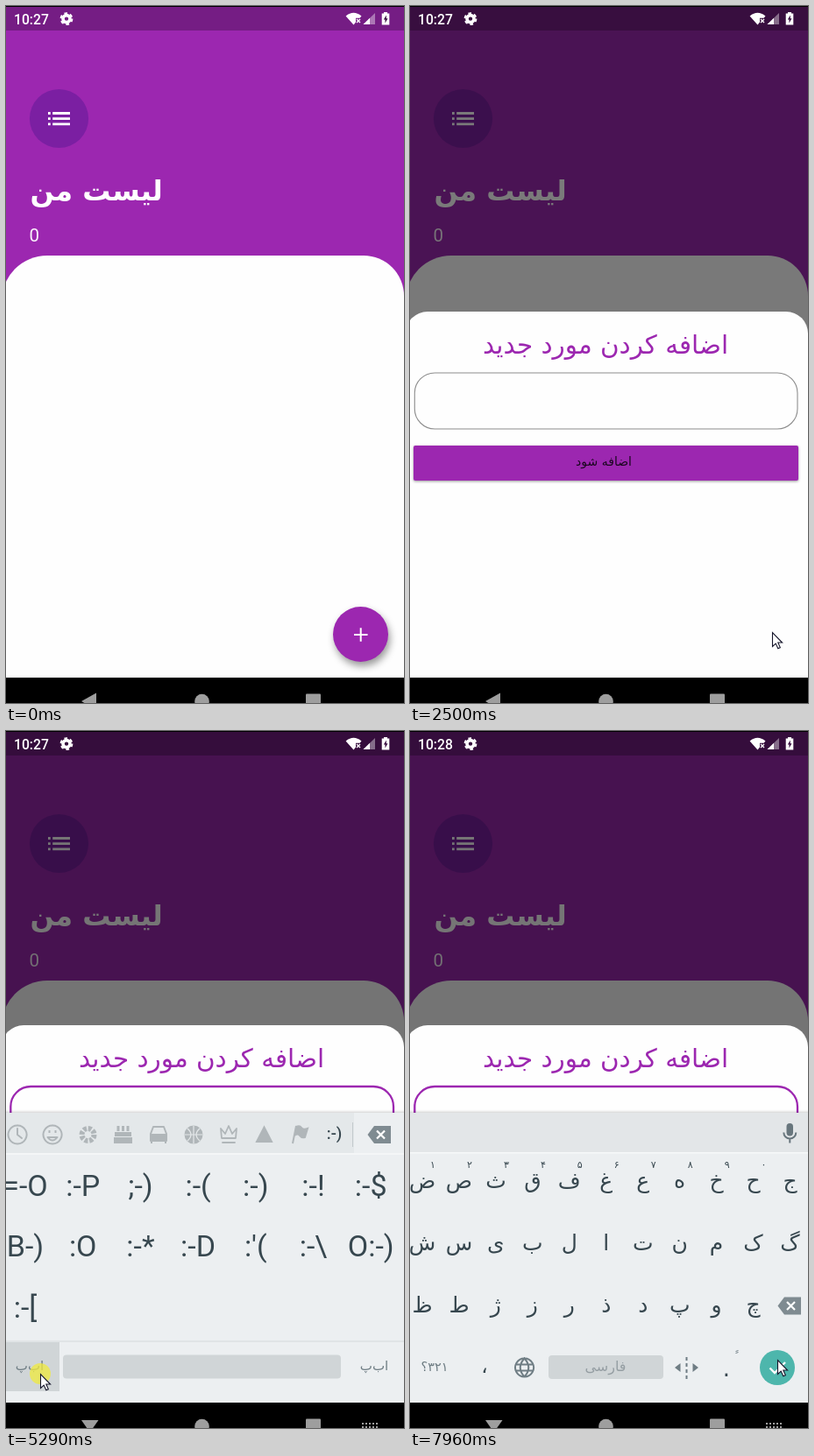
An HTML page for the animation above (8 s loop, 454 px wide and 796 px high).

```html
<!DOCTYPE html>
<html lang="fa">
<head>
<meta charset="utf-8">
<title>List</title>
<style>
  html, body { margin: 0; width: 100%; height: 100%; overflow: hidden; background: #000; }
  svg { display: block; width: 100%; height: 100%; }
  text { font-family: Roboto, "DejaVu Sans", sans-serif; white-space: pre; }
  .fa { font-family: "DejaVu Sans", sans-serif; }
  .mid { text-anchor: middle; }
  .line { fill: none; stroke-linecap: round; stroke-linejoin: round; }
</style>
</head>
<body>
<svg viewBox="0 0 454 796" xmlns="http://www.w3.org/2000/svg">
  <!-- list page -->
  <rect y="1" width="454" height="766" fill="#9c27b0"/>
  <rect y="1" width="454" height="27" fill="#751d84"/>
  <circle cx="60.5" cy="128.5" r="33.6" fill="#7b1fa2"/>
  <path d="M48 122.5h2.7m2.5 0H73M48 128.7h2.7m2.5 0H73M48 134.9h2.7m2.5 0H73" stroke="#fff" stroke-width="2.8"/>
  <text class="fa" x="27.5" y="222" font-size="32" font-weight="700" fill="#fff">لیست من</text>
  <text x="26.5" y="269" font-size="20.5" fill="#fff" fill-opacity=".94">0</text>
  <path d="M-5 767V337A52 52 0 0 1 47 285H408A46 46 0 0 1 454 331V767Z" fill="#fefefe"/>
  <path id="glow" d="M10 0H437V20Q223.5 52 10 20Z" fill="#9c27b0"/>
  <circle cx="404.5" cy="717.5" r="31.5" fill="#9c27b0" style="filter:drop-shadow(2px 5px 4px #0006)"/>
  <path d="M397 718H412.5M404.7 710.3V725.8" stroke="#fff" stroke-width="2"/>
  <rect id="scrim" y="1" width="454" height="766"/>

  <!-- status icons -->
  <text id="clock" x="9" y="21" font-size="15.7" font-weight="500" fill="#fff"></text>
  <g fill="#fff">
    <circle cx="69" cy="14.6" r="4" fill="none" stroke="#fff" stroke-width="3.6"/>
    <circle cx="69" cy="14.6" r="6.4" fill="none" stroke="#fff" stroke-width="2" stroke-dasharray="3.6 3.1"/>
    <path d="M387.6 11.5Q396.5 4 405.5 11.5L403.5 13.8H399V18.5L396.5 21.5Z"/>
    <path d="M400 15l4 4m0-4l-4 4" stroke="#fff" stroke-width="1.4"/>
    <path d="M421 8V21H407.5Z" opacity=".4"/>
    <path d="M415 13.8V21H407.5Z"/>
    <path d="M431 8.5V7h4v1.5h2.3V21.5h-8.6V8.5z"/>
  </g>
  <path d="M433.8 10.5L430.8 15.5H432.5V19.5L435.5 14.3H433.8Z" fill="#3a0f42"/>

  <!-- bottom sheet -->
  <g id="sheet">
    <path d="M-5 440V25A25 25 0 0 1 20 0H429A25 25 0 0 1 454 25V440Z" fill="#fefefe"/>
    <text class="fa mid" x="223" y="48" font-size="29.4" fill="#9c27b0">اضافه کردن مورد جدید</text>
    <rect id="field" x="5.3" y="70" width="436.7" height="64" rx="23" fill="none"/>
    <rect id="caret" x="15.5" y="91" width="2" height="25" fill="#4285f4"/>
    <rect x="4" y="153" width="439" height="40" rx="2" fill="#9c27b0" style="filter:drop-shadow(0 1.5px 1.5px #0006)"/>
    <text class="fa mid" x="221" y="176" font-size="14" fill="#1b0720">اضافه شود</text>
  </g>

  <!-- keyboards -->
  <g id="keyboard">
    <rect x="-5" y="436" width="464" height="340" fill="#eceff1" style="filter:drop-shadow(0 -1px 1.5px #0003)"/>
    <g id="emoticons">
      <rect y="436" width="397" height="46" fill="#e4e8ea"/>
      <path d="M0 483H454" stroke="#f7f9fa" stroke-width="1.5"/>
      <path d="M395.5 447V475" stroke="#c3c9cc"/>
      <g fill="#b0b6b9" stroke="#b0b6b9" stroke-width="2">
        <path class="line" d="M13 454V461L18 465M13 450.5a10.5 10.5 0 1 0 .1 0M53 450.5a10.5 10.5 0 1 0 .1 0M47.5 464Q53 471 58.5 464Z"/>
        <path d="M48.500 457.5h2m5 0h2" stroke-width="3"/>
        <circle cx="93.5" cy="461" r="7" fill="none" stroke-width="6" stroke-dasharray="3.8 1.7"/>
        <path d="M124 465h19v5h-19zM125 459h17v3h-17z"/>
        <path d="M128 451v6m5.500-6v6m5.5-6v6" stroke-width="3"/>
        <path d="M165 460l3-8h12l3 8v8h-18z" class="line"/>
        <path d="M165 461h18v5h-18zM166 469v2m16-2v2"/>
        <circle cx="214" cy="461" r="9.5"/>
        <path class="line" d="M246 465L245 454L250 460L254 451L258 460L263 454L262 465ZM247 470H261" stroke-width="1.8"/>
        <path d="M294.5 452.5L303 469H286Z"/>
        <path d="M327 471L331 451M331 452Q335 450 337 453T344 454L341 464Q337 465 335 462T329 462Z"/>
      </g>
      <path d="M214 451V471M204 461H224M207 454Q215 461 207 468M221 454Q213 461 221 468" class="line" stroke="#e4e8ea" stroke-width="1.2"/>
      <text class="mid" x="374.5" y="466" font-size="18.5" font-weight="500" fill="#37474f">:-)</text>
      <path d="M0 697H454" stroke="#dde1e3" stroke-width="1.5"/>
      <rect id="pressed" y="698" width="61" height="56" fill="#d0d5d7"/>
      <rect x="65" y="712.5" width="317" height="27" rx="4" fill="#d0d5d7"/>
    </g>
    <g id="letters">
      <rect y="436" width="454" height="45" fill="#e3e6e8"/>
      <path d="M0 481.7H454" stroke="#f7f9fa" stroke-width="1.5"/>
      <rect x="429.5" y="448" width="7.5" height="14.5" rx="3.7" fill="#68767d"/>
      <path d="M426.3 458.5a7 7 0 0 0 14 0M433.3 466V470.5" fill="none" stroke="#68767d" stroke-width="2"/>
      <path d="M130.5 716.5a10.5 10.5 0 1 0 .1 0M130.5 716.5Q121 727 130.5 737.5Q140 727 130.5 716.5M121 723.5H140M121 730.5H140" class="line" stroke="#6f7d84" stroke-width="2"/>
      <rect x="158" y="713" width="131" height="27" rx="4" fill="#d0d5d7"/>
      <path d="M308.5 722V732L302 727ZM322.5 722V732L329 727Z" fill="#6f7d84"/>
      <path d="M315.5 715V740" stroke="#6f7d84" stroke-width="2" stroke-dasharray="4 3"/>
      <path d="M371.5 708.5l3-1m-3 3l3-1" stroke="#6f7d84"/>
      <circle cx="419" cy="727" r="20" fill="#4db6ac"/>
      <path d="M410.5 727.5L416 733L428 721" fill="none" stroke="#fff" stroke-width="2.4"/>
      <g id="popup">
        <rect x="123" y="600" width="34" height="12.5" fill="#c3c9cc"/>
        <rect x="113" y="483" width="54.5" height="125" rx="3" fill="#d0d5d7" style="filter:drop-shadow(0 1.5px 1px #0007)"/>
      </g>
    </g>
    <g id="erase">
      <path d="M427 646.5H446V666.5H427L419.5 656.5Z" fill="#7f8b91"/>
      <path d="M430 652l9 9m0-9l-9 9" stroke="#fff" stroke-width="2.2"/>
    </g>
  </g>

  <!-- navigation bar -->
  <rect y="767" width="454" height="29"/>
  <g fill="#9e9e9e">
    <path id="back"/>
    <circle cx="223.5" cy="794" r="8.3"/>
    <rect x="342" y="785.5" width="17" height="17" rx="1"/>
    <path id="keys" d="M406 791H424M406 795H424" stroke="#9e9e9e" stroke-width="2" stroke-dasharray="2 2"/>
  </g>

  <g id="pointer">
    <circle id="press" r="12" fill="#f0ea3c" opacity=".75"/>
    <path d="M.5 .5V16.5L4.2 13.1L6.8 18.7L9.3 17.6L6.8 12H11.6Z" fill="#fff" stroke="#15152a" stroke-width="1.1"/>
  </g>
</svg>
<script>
const $ = id => document.getElementById(id);
const INK = '#37474f', GREY = '#6f7d84';

function label(parent, text, x, y, size, fill, type = 'fa') {
  const el = document.createElementNS('http://www.w3.org/2000/svg', 'text');
  const attrs = { x, y, 'font-size': size, fill, class: type + ' mid' };
  for (const name in attrs) el.setAttribute(name, attrs[name]);
  el.textContent = text;
  parent.append(el);
}

// Emoticon page
['=-O :-P ;-) :-( :-) :-! :-$', "B-) :O :-* :-D :'( :-\\ O:-)", ':-['].forEach((row, r) =>
  row.split(' ').forEach((face, i) =>
    label($('emoticons'), face, 22 + 65.7 * i, Math.floor(531 + 69.5 * r), 34, INK, 'latin')));
for (const x of [27, 420]) label($('emoticons'), 'اب\u200cپ', x, 730, 15, GREY);

// Letter page
const letters = $('letters'), popup = $('popup');
['ضصثقفغعهخحج', 'شسیبلاتنمکگ', 'ظطژزرذدپوچ'].forEach((row, r) =>
  [...row].forEach((key, i) => label(letters, key, 14 + 41.95 * i, 522 + 71 * r, 25, INK)));
[...'۱۲۳۴۵۶۷۸۹۰'].forEach((digit, i) => label(letters, digit, 26 + 41.95 * i, 499, 11, INK));
label(letters, '\u200f۳۲۱؟', 28, 731, 14.5, GREY);
label(letters, '،', 85, 733, 23, INK);
label(letters, '.', 361, 737, 26, INK);
label(letters, 'فارسی', 223, 731, 16, '#959ea3');
label(popup, 'ب', 140, 525, 36, '#263238');
letters.append(popup);

// Key lists: [time, value, ...]
const pointerPath = [
  [460, 205, 420], [1240, 236, 634], [1550, 230, 566], [2020, 404, 716], [2180, 413, 715],
  [2500, 413, 715], [3270, 222, 440], [4050, 222, 440], [4360, 117, 681], [5140, 39, 734],
  [5610, 39, 734], [6080, 53, 672], [6235, 53, 672], [6850, 123, 587], [7170, 123, 587],
  [7320, 298, 650], [7480, 298, 650], [7940, 419, 718]];
const sheetTop = [[2180, 767], [2338, 480], [2494, 349], [2640, 336]];
const scrimAlpha = [[2180, 0], [2494, .52], [2640, .54]];
const glowSize = [[770, 0], [1240, 1], [1560, 1], [1870, 0]];
const keyboardDrop = [[4400, 331], [4660, 0]];
const presses = [[600, 1390], [2010, 2170], [3570, 3730], [5280, 5440], [6840, 6990]];
const caretOn = [[4820, 5270], [5440, 5900], [6380, 6840], [6990, 7500]];

function at(keys, t) {
  const next = keys.findIndex(k => k[0] > t);
  if (next < 0) return keys[keys.length - 1].slice(1);
  if (next === 0) return keys[0].slice(1);
  const a = keys[next - 1], b = keys[next], p = (t - a[0]) / (b[0] - a[0]);
  return a.slice(1).map((v, i) => v + (b[i + 1] - v) * p);
}
const within = (spans, t) => spans.some(([from, to]) => t >= from && t < to);
const show = (id, on) => $(id).setAttribute('visibility', on ? 'inherit' : 'hidden');
const set = (id, name, value) => $(id).setAttribute(name, value);

function draw(t) {
  const focused = t >= 3730, farsi = t >= 5440;
  const [x, y] = at(pointerPath, t), [top] = at(sheetTop, t);
  const [glow] = at(glowSize, t), [drop] = at(keyboardDrop, t);

  $('clock').textContent = t < 7660 ? '10:27' : '10:28';
  set('glow', 'transform', `translate(0 302) scale(1 ${glow})`);
  set('glow', 'opacity', .155 * Math.min(1, glow * 2));
  set('scrim', 'opacity', at(scrimAlpha, t)[0]);

  set('sheet', 'transform', `translate(0 ${top})`);
  show('sheet', t > 2180);
  set('field', 'stroke', focused ? '#9c27b0' : '#8e8e8e');
  set('field', 'stroke-width', focused ? 2.3 : 1.1);
  show('caret', within(caretOn, t));

  set('keyboard', 'transform', `translate(0 ${drop})`);
  show('keyboard', drop < 331);
  show('emoticons', !farsi);
  show('letters', farsi);
  show('pressed', within([[5280, 5440]], t));
  show('popup', within([[6840, 7160]], t));
  set('erase', 'transform', farsi ? '' : 'translate(-7 -195.5)');

  set('back', 'd', t < 4500 ? 'M86 794L103 784.5V804Z' : 'M86 787H105.5L95.7 801Z');
  show('keys', t >= 3880);

  set('pointer', 'transform', `translate(${x} ${y})`);
  show('pointer', t >= 460);
  show('press', within(presses, t));
}

// Children inherit visibility, so hidden pages must also hide their own parts.
function drawPages(t) {
  draw(t);
  $('emoticons').style.display = t < 5440 ? '' : 'none';
  $('letters').style.display = t < 5440 ? 'none' : '';
}

const STEP = 155.7;
function frame() {
  const t = performance.now() % 8000;
  drawPages(t < 455 ? 0 : 470 + Math.floor((t - 455) / STEP) * STEP);
  requestAnimationFrame(frame);
}
frame();
</script>
</body>
</html>
```
